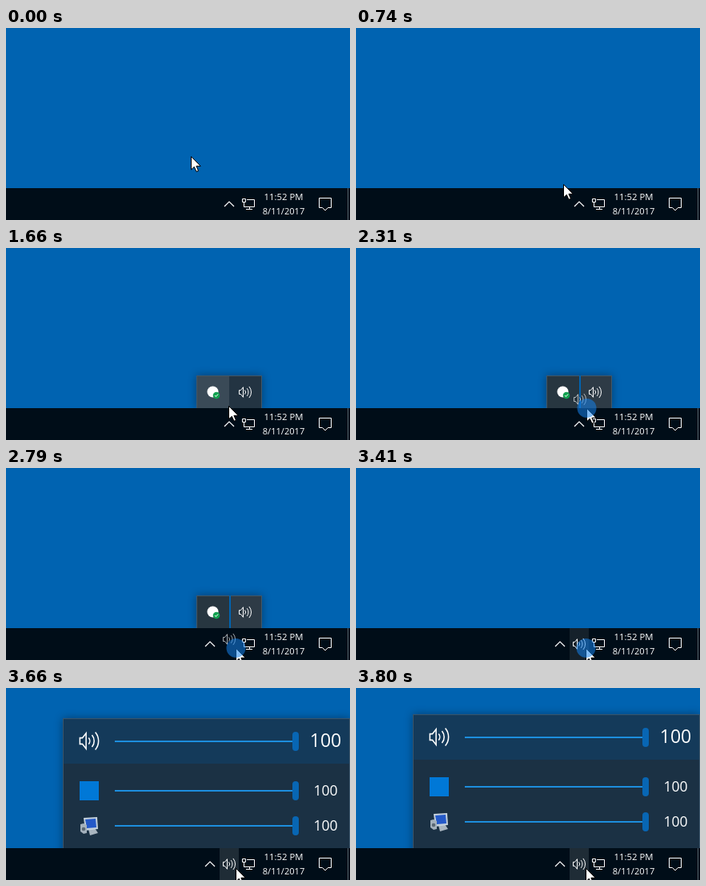
Recreate the animation shown at these times as an HTML page with a canvas. Size 430 by 241 pixels, loop 6050 ms.

```html
<!DOCTYPE html>
<html lang="en">
<head>
<meta charset="utf-8">
<title>Volume tray icon</title>
<style>
  html, body { margin: 0; width: 100%; height: 100%; overflow: hidden; background: #0063b1; }
  canvas { display: block; }
</style>
</head>
<body>
<canvas id="stage" width="430" height="241"></canvas>
<script>
const ctx = document.getElementById('stage').getContext('2d');
const LOOP = 6050, BAR_TOP = 201;
const DESKTOP = '#0063b1', BAR = '#000d18', WHITE = '#fff';
const FONT = '"Open Sans", "Noto Sans", sans-serif';

const sineIn = p => 1 - Math.cos(p * Math.PI / 2);
const sineOut = p => Math.sin(p * Math.PI / 2);
const sineInOut = p => (1 - Math.cos(p * Math.PI)) / 2;

// Pointer path: time, x, y, easing towards this point
const path = [
  [100, 231, 161],
  [740, 259, 196, sineIn],
  [1080, 274, 222, sineOut],
  [1360, 274, 222, sineOut],
  [1660, 278, 198, sineIn],
  [1900, 293, 187, sineOut],
  [2030, 293, 187, sineOut],
  [2310, 288, 201, sineIn],
  [2610, 287, 218, sineOut],
  [2820, 287, 226, sineInOut]
];

// Mouse button held: start, end
const presses = [[1110, 1220], [2030, 2850], [3410, 3490]];

const within = (t, a, b) => t >= a && t < b;

function pointerAt(t) {
  let [t0, x0, y0] = path[0];
  for (const [t1, x1, y1, ease] of path) {
    if (t < t1 && ease) {
      const f = ease(Math.max(0, t - t0) / (t1 - t0));
      return [Math.round(x0 + (x1 - x0) * f), Math.round(y0 + (y1 - y0) * f)];
    }
    [t0, x0, y0] = [t1, x1, y1];
    if (t < t1) break;
  }
  return [x0, y0];
}

function rect(x, y, w, h, color) {
  ctx.fillStyle = color;
  ctx.fillRect(x, y, w, h);
}

function trace(points, close) {
  ctx.beginPath();
  points.forEach(([x, y]) => ctx.lineTo(x, y));
  if (close) ctx.closePath();
}

function line(points, close, color = WHITE, width = 1) {
  trace(points, close);
  ctx.strokeStyle = color;
  ctx.lineWidth = width;
  ctx.stroke();
}

function shape(points, color) {
  trace(points, true);
  ctx.fillStyle = color;
  ctx.fill();
}

function disc(x, y, r, color) {
  ctx.beginPath();
  ctx.arc(x, y, r, 0, Math.PI * 2);
  ctx.fillStyle = color;
  ctx.fill();
}

function text(str, x, y, size, weight = 400) {
  ctx.font = `${weight} ${size}px ${FONT}`;
  ctx.textAlign = 'center';
  ctx.fillStyle = WHITE;
  ctx.fillText(str, x, y);
}

// Bordered backdrop with a soft shadow
function frame(x, y, w, h, color) {
  ctx.save();
  ctx.shadowColor = 'rgba(0, 0, 0, 0.38)';
  ctx.shadowBlur = 10;
  rect(x, y, w, h, color);
  ctx.restore();
}

function speaker(x, y, scale = 1, alpha = 1) {
  ctx.save();
  ctx.globalAlpha = alpha;
  ctx.translate(x, y);
  ctx.scale(scale, scale);
  line([[-7.5, -2.5], [-5.5, -2.5], [-2.5, -6.3], [-2.5, 6.3], [-5.5, 2.5], [-7.5, 2.5]], true);
  for (const r of [4, 7.5, 11]) {
    ctx.beginPath();
    ctx.arc(-3.5, 0, r, -0.7, 0.7);
    ctx.stroke();
  }
  ctx.restore();
}

function shieldIcon(x, y) {
  disc(x - 0.5, y - 0.5, 7, WHITE);
  disc(x + 4, y + 4, 4.3, '#12a150');
  line([[x + 2, y + 4], [x + 3.5, y + 5.5], [x + 6, y + 2.5]], false);
}

function flyout(x, cells, colors, gap) {
  const w = cells * 40;
  frame(x - 1, 160, w + 2, 41, '#435767');
  colors.forEach((c, i) => rect(x + i * 40, 161, 40, 40, c));
  if (gap) rect(x + 40, 160, 2, 41, DESKTOP);
  shieldIcon(x + 20, 181);
  if (cells > 1) speaker(x + 60, 181);
}

function slider(y) {
  rect(136, y - 1, 224, 2, '#1d8ede');
  ctx.beginPath();
  ctx.roundRect(358, y - 12, 8, 24, 4);
  ctx.fillStyle = '#0866b4';
  ctx.fill();
}

function computerIcon(x, y) {
  shape([[x + 10, y + 15], [x + 18, y + 14], [x + 22, y + 20], [x + 12, y + 23]], '#a9b5bf');
  shape([[x + 4, y + 1], [x + 21, y], [x + 22, y + 15], [x + 6, y + 17]], '#c3d0dc');
  shape([[x + 6, y + 3], [x + 19, y + 2], [x + 20, y + 13], [x + 8, y + 14]], '#2459c8');
  shape([[x, y + 9], [x + 4, y + 8], [x + 8, y + 10], [x + 8, y + 20], [x + 4, y + 21], [x, y + 18]], '#a4b1bc');
  disc(x + 4, y + 15, 2.3, '#5b6975');
}

function mixer(top) {
  frame(71, top - 1, 359, 210, '#3a5469');
  rect(72, top, 357, 56, '#143a5a');
  rect(72, top + 56, 357, 150, '#1b3144');
  speaker(104, top + 27.5, 1.55);
  rect(92, top + 78, 24, 24, '#0078d7');
  computerIcon(93, top + 123);
  [28, 90, 134].forEach(dy => slider(top + dy));
  text('100', 399.5, top + 35, 23);
  text('100', 399.5, top + 96, 17.6);
  text('100', 399.5, top + 140, 17.6);
}

function taskbar(caretX, hover, hasSpeaker) {
  rect(0, BAR_TOP, 430, 40, BAR);
  if (hover) rect(267, BAR_TOP, 24, 40, hover);
  line([[caretX - 6, 224], [caretX, 218], [caretX + 6, 224]], false, WHITE, 1.2);
  if (hasSpeaker) speaker(279, 221);

  // Network
  line([[297.5, 215.5], [310.5, 215.5], [310.5, 224.5], [297.5, 224.5]], true);
  line([[304.5, 224.5], [304.5, 227.5]]);
  line([[300, 227.5], [308, 227.5]]);
  rect(295, 214, 6, 6, BAR);
  line([[295.5, 214.5], [299.5, 214.5], [299.5, 218.5], [295.5, 218.5]], true);
  line([[297.5, 218.5], [297.5, 224.5]]);

  text('11:52 PM', 347, 216, 11.3, 500);
  text('8/11/2017', 347, 234, 11.1, 500);

  // Notifications
  line([[391.5, 213.5], [406.5, 213.5], [406.5, 225.5], [402.5, 225.5],
        [399, 229], [395.5, 225.5], [391.5, 225.5]], true);
  rect(427, BAR_TOP, 1, 40, '#58626a');
}

function pointer(x, y) {
  const arrow = [[0, 0], [0, 16.5], [3.8, 13], [6.5, 19], [9, 18], [6.4, 12], [11.7, 12]]
    .map(([dx, dy]) => [x + 0.5 + dx, y + 0.3 + dy]);
  shape(arrow, WHITE);
  line(arrow, true, '#000');
}

function draw(t) {
  const [x, y] = pointerAt(t);
  const dragging = within(t, 2120, 2850);
  const dropped = t >= 2850;
  rect(0, 0, 430, 241, DESKTOP);

  if (t >= 3490) {
    const p = Math.min(1, (t - 3490) / 310);
    mixer(Math.round(34 + 54 * (1 - p) ** 3));
  } else if (within(t, 1200, 2850)) {
    const over = y < BAR_TOP ? (x < 279 ? 0 : 1) : -1;
    const colors = dragging
      ? ['#273640', '#2e3b46']
      : [0, 1].map(i => i === over ? '#3a4a57' : '#233442');
    flyout(239, 2, colors, dragging);
  } else if (within(t, 2850, 3000)) {
    flyout(235, 1, ['#233442']);
  }

  const onIcon = y >= BAR_TOP && x >= 267 && x < 291 && !within(t, 2030, 2850);
  const hover = onIcon && (t >= 3490 ? '#1f2c36' : '#15212b');
  taskbar(t >= 2640 ? 255 : 279, hover, dropped);

  if (dragging) speaker(x - 8, y - 11, 1, 0.65);
  pointer(x, y);
  if (presses.some(([a, b]) => within(t, a, b))) {
    disc(x + 0.5, y, 12, 'rgba(20, 130, 235, 0.55)');
  }
}

const start = performance.now();
function tick() {
  draw((performance.now() - start) % LOOP);
  requestAnimationFrame(tick);
}
tick();
</script>
</body>
</html>
```
